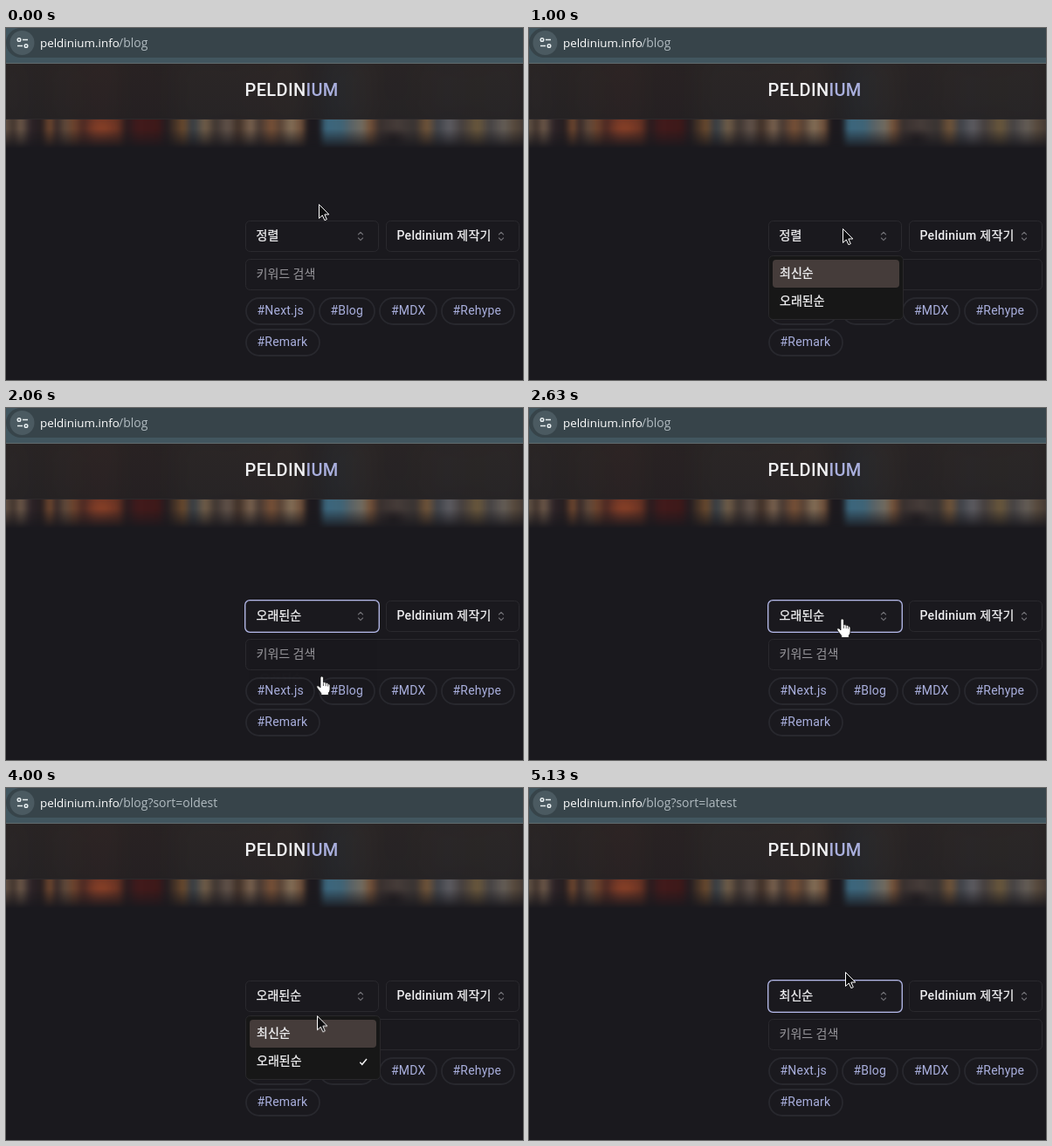
Animation, 592 px wide and 404 px high, one loop 5.56 s. Source, as an HTML page:

```html
<!DOCTYPE html>
<html lang="ko">
<head>
<meta charset="utf-8">
<title>Blog sort menu</title>
<style>
html, body { margin: 0; width: 100%; height: 100%; overflow: hidden; background: #1a191e; }
#stage { position: relative; width: 592px; height: 404px; overflow: hidden; background: #1a191e; }
#stage > * { position: absolute; left: 0; }

.bar { top: 0; width: 592px; height: 40px; background: #42565f; border-bottom: 1px solid #606a6d; }
.pill { position: absolute; width: 640px; height: 34px; border-radius: 17px; background: #37444a; }

.head, .strip { width: 592px; overflow: hidden; }
.head { top: 41px; height: 63px; background: linear-gradient(#272324, #232123); border-bottom: 1px solid #2c292b; }
.strip { top: 105px; height: 36px; opacity: .88; -webkit-mask: linear-gradient(#000 30%, #0000 92%); mask: linear-gradient(#000 30%, #0000 92%); }
.books {
  position: absolute; inset: -8px;
  background:
    radial-gradient(ellipse 20px 16px at 118px 18px, #964528, #0000),
    radial-gradient(ellipse 18px 14px at 452px 32px, #201a1d, #0000),
    linear-gradient(90deg, #6b5a4a 8px, #463730 16px, #78624f 25px, #31262a 36px, #261e20 48px,
      #7c4e31 58px, #3b2c2a 66px, #69503f 76px, #78482e 86px, #542c24 96px, #7c3a28 112px,
      #703523 136px, #2b1c1f 146px, #481b1b 160px, #421919 182px, #241d21 192px, #74502f 211px,
      #37414a 222px, #7d674e 236px, #443934 248px, #6b5b50 262px, #443228 274px, #866c55 288px,
      #4e3e36 298px, #85583a 312px, #604838 322px, #917a60 334px, #7a573d 346px, #1d191d 354px,
      #1d1a1f 366px, #40718a 374px, #446f84 392px, #5f6d72 402px, #7e7668 416px, #80583a 425px,
      #3d3331 436px, #4c413d 456px, #3d3735 476px, #7c5c3b 490px, #43474e 502px, #66656a 516px,
      #4b4442 530px, #75603f 548px, #4b4849 562px, #6e665e 578px, #5f5041 590px, #3d3533 608px);
  filter: blur(2.5px);
}
.head .books { filter: blur(12px); opacity: .08; }

svg { top: 0; }
text { font: 400 14px Roboto, "Noto Sans CJK KR", "Noto Sans CJK", "Noto Sans", sans-serif; fill: #f0f0f2; white-space: pre; }
.url text { font-family: "Open Sans", "Noto Sans", sans-serif; }
.path { fill: #b1bbc0; }
.host { font-size: 13.4px; fill: #fff; }
.logo text { font-size: 20px; font-weight: 500; letter-spacing: .35px; }
.logo .tail, .tags text { fill: #a9afdd; }
.tags text { letter-spacing: .2px; }
.strong text { font-weight: 500; }
.ko { stroke: #f0f0f2; stroke-width: .3px; }
.name { letter-spacing: .25px; }
text.hint { fill: #99989d; }
.box { fill: none; stroke: #2a292e; }
.tags rect { fill: none; stroke: #28282e; stroke-width: 1.8; }
.chev { fill: none; stroke: #6f6e73; stroke-width: 1.1; stroke-linecap: round; stroke-linejoin: round; }

.a { animation: 5560ms infinite; }
.hard { animation-timing-function: step-end; }
.first { animation-name: first; }
.old { animation-name: old; }
.new { animation-name: new; }
.u0 { animation-name: u0; }
.u1 { animation-name: u1; }
.u2 { animation-name: u2; }
.ring { animation-name: ring; }
.hover { animation-name: hover; }
.check { animation-name: check; }
.menu { animation-name: menu; transform-origin: 351px 262px; }
.cursor { animation-name: move; }
.arrow { animation-name: arrow; }
.hand { animation-name: hand; }

@keyframes first { 0% { opacity: 1 } 34.7%, to { opacity: 0 } }
@keyframes old { 0% { opacity: 0 } 34.7% { opacity: 1 } 78.06%, to { opacity: 0 } }
@keyframes new { 0% { opacity: 0 } 78.06%, to { opacity: 1 } }
@keyframes u0 { 0% { opacity: 1 } 52.85%, to { opacity: 0 } }
@keyframes u1 { 0% { opacity: 0 } 52.85% { opacity: 1 } 92.1%, to { opacity: 0 } }
@keyframes u2 { 0% { opacity: 0 } 92.1%, to { opacity: 1 } }
@keyframes ring { 0% { opacity: 0 } 34.7% { opacity: 1 } 66.2% { opacity: 0 } 78.06%, to { opacity: 1 } }
@keyframes check { 0% { opacity: 0 } 50%, to { opacity: 1 } }
@keyframes hover {
  0% { transform: none }
  27.5% { transform: translateY(32px) }
  71.2%, to { transform: none }
}
@keyframes menu {
  0%, 11.33% { opacity: 0; transform: translateY(-8px) scale(.95) }
  14.03%, 34.7% { opacity: 1; transform: none }
  37.4% { opacity: 0; transform: scale(.95) }
  37.5%, 66.2% { opacity: 0; transform: translateY(-8px) scale(.95) }
  68.9%, 78.06% { opacity: 1; transform: none }
  80.76% { opacity: 0; transform: scale(.95) }
  80.86%, to { opacity: 0; transform: translateY(-8px) scale(.95) }
}
@keyframes move {
  0%, 1.08% { transform: translate(358px, 202px) }
  6.83%, 21.4% { transform: translate(359px, 230px) }
  29.2%, 40.47% { transform: translate(360px, 308px) }
  46.76%, 67.27% { transform: translate(357px, 242px) }
  71.9% { transform: translate(356px, 261px) }
  75.18%, 82% { transform: translate(358px, 284px) }
  91.2%, to { transform: translate(362px, 211px) }
}
@keyframes arrow {
  0% { opacity: 1 } 4.4% { opacity: 0 } 11.33% { opacity: 1 } 34.7% { opacity: 0 }
  67.27% { opacity: 1 } 85.4% { opacity: 0 } 88.4%, to { opacity: 1 }
}
@keyframes hand {
  0% { opacity: 0 } 4.4% { opacity: 1 } 11.33% { opacity: 0 } 34.7% { opacity: 1 }
  67.27% { opacity: 0 } 85.4% { opacity: 1 } 88.4%, to { opacity: 0 }
}
</style>
</head>
<body>
<div id="stage">
  <div class="bar"><div class="pill"></div></div>
  <div class="head"><div class="books"></div></div>
  <div class="strip"><div class="books"></div></div>

  <svg width="592" height="404" viewBox="0 0 592 404">
    <defs>
      <path id="chev" class="chev" d="M-2.6 -2L0 -4.6L2.6 -2M-2.6 2L0 4.6L2.6 2"/>
    </defs>

    <g class="url">
      <circle cx="18.5" cy="17" r="14" fill="#4b5a61"/>
      <g fill="none" stroke="#e8eef0" stroke-width="1.5">
        <circle cx="15" cy="13.5" r="1.8"/>
        <path d="M19 13.5H25M13 20.5H19"/>
        <circle cx="23" cy="20.5" r="1.8"/>
      </g>
      <text class="host" x="39" y="22">peldinium.info</text>
      <text class="path a hard u0" x="129" y="22">/blog</text>
      <text class="path a hard u1" x="129" y="22">/blog?sort=oldest</text>
      <text class="path a hard u2" x="129" y="22">/blog?sort=latest</text>
    </g>

    <g class="logo">
      <text x="273.5" y="78">PELDIN<tspan class="tail">IUM</tspan></text>
    </g>

    <g class="box">
      <rect x="274.5" y="221.5" width="152" height="35" rx="5"/>
      <rect x="435.5" y="221.5" width="152" height="35" rx="5"/>
      <rect x="274.5" y="265.5" width="313" height="35" rx="5"/>
    </g>
    <rect class="a hard ring" x="273.7" y="220.7" width="153.6" height="36.6" rx="5.5" fill="none" stroke="#b4b9ea" stroke-width="1.3"/>
    <use href="#chev" x="406" y="239"/>
    <use href="#chev" x="567" y="239"/>
    <g class="strong">
      <g class="ko">
        <text class="a hard first" x="286.5" y="243">정렬</text>
        <text class="a hard old" x="286.5" y="243">오래된순</text>
        <text class="a hard new" x="286.5" y="243">최신순</text>
      </g>
      <text class="name" x="447.5" y="243">Peldinium <tspan class="ko">제작기</tspan></text>
    </g>
    <text class="hint" x="286.5" y="287">키워드 검색</text>

    <g class="tags">
      <rect x="275" y="310" width="78" height="30" rx="15"/>
      <rect x="359" y="310" width="63" height="30" rx="15"/>
      <rect x="428" y="310" width="65" height="30" rx="15"/>
      <rect x="499" y="310" width="83" height="30" rx="15"/>
      <rect x="275" y="346" width="84" height="30" rx="15"/>
      <text x="287.5" y="329">#Next.js</text>
      <text x="371.5" y="329">#Blog</text>
      <text x="441" y="329">#MDX</text>
      <text x="511.5" y="329">#Rehype</text>
      <text x="287.5" y="365">#Remark</text>
    </g>

    <g class="a menu strong">
      <rect x="274.5" y="261.5" width="154" height="73" rx="5" fill="#171717" stroke="#29282b"/>
      <rect class="a hard hover" x="279" y="266" width="145" height="32" rx="4" fill="#453c3a"/>
      <g class="ko">
        <text x="287" y="286">최신순</text>
        <text x="287" y="318">오래된순</text>
      </g>
      <path class="a hard check" d="M405.3 314.8L407.8 317.3L413 311" fill="none" stroke="#f0f0f2" stroke-width="1.5"/>
    </g>

    <g class="a cursor" stroke-linejoin="round">
      <path class="a hard arrow" d="M.5 .5V16.5L4.3 13L6.9 18.7L9.3 17.6L6.8 12H11.8Z" fill="#0c0c0e" stroke="#fff"/>
      <g class="a hard hand" stroke="#111">
        <path d="M0 1.8Q0 0 1.7 0T3.4 1.8V7Q5 6 6.2 7.6Q7.8 6.8 8.7 8.6Q11 8 11 10.5V15Q11 17.5 9.3 19V21.5H.8V19.4L-4 13Q-4.8 11.2 -3.2 10.8Q-1.8 10.6 0 13Z" fill="#fff" stroke-width=".8"/>
        <path d="M3.4 7.5V11M6.2 8V11.2M8.7 9V11.5" fill="none" stroke-width=".7"/>
      </g>
    </g>
  </svg>
</div>
</body>
</html>
```
